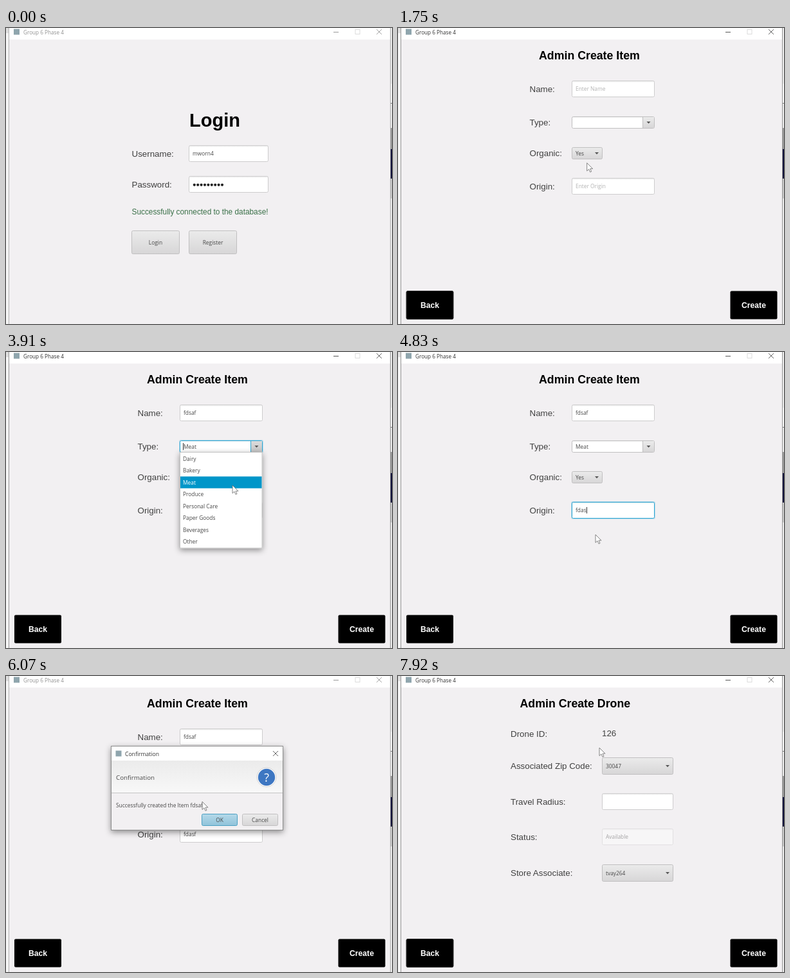
Recreate the animation shown at these times as an HTML page. Size 600x462 px, loop 8000 ms.

```html
<!DOCTYPE html>
<html lang="en">
<head>
<meta charset="utf-8">
<title>Item and drone forms</title>
<style>
  html, body { margin: 0; width: 100%; height: 100%; overflow: hidden; background: #f2f0f2; }
  svg { display: block; width: 600px; height: 462px; }
  text { white-space: pre; }
  .ui { font-family: "Open Sans", "Noto Sans", sans-serif; }
  .form { font-family: "Liberation Sans", Arial, sans-serif; }
</style>
</head>
<body>
<svg viewBox="0 0 600 462">
  <defs>
    <linearGradient id="face" x2="0" y2="1"><stop stop-color="#ebebeb"/><stop offset="1" stop-color="#d7d6d7"/></linearGradient>
    <linearGradient id="down" x2="0" y2="1"><stop stop-color="#dcdcdc"/><stop offset="1" stop-color="#c4c4c4"/></linearGradient>
    <linearGradient id="blue" x2="0" y2="1"><stop stop-color="#b5d9e9"/><stop offset="1" stop-color="#90c3da"/></linearGradient>
    <linearGradient id="head" x2="0" y2="1"><stop stop-color="#ebebeb"/><stop offset="1" stop-color="#f8f8f8"/></linearGradient>
    <linearGradient id="well" x2="0" y2="1"><stop stop-color="#e9e9e9"/><stop offset=".12" stop-color="#fff"/></linearGradient>
    <filter id="drop" x="-20%" y="-20%" width="140%" height="140%"><feDropShadow dx="0" dy="3" stdDeviation="5" flood-opacity=".42"/></filter>
  </defs>
  <g id="scene"></g>
  <g id="arrow"><path d="M0 0V12.5L3 9.8L5 14.3L7 13.4L5 9.1H9Z" fill="#fff" stroke="#666" stroke-width=".8"/></g>
  <g id="beam"><path d="M-2.5 -5.5H2.5M0 -5.5V5.5M-2.5 5.5H2.5" fill="none" stroke="#555" stroke-width=".9"/></g>
</svg>
<script>
const LOOP = 8000, STEP = 102.8;
const RING = '#2ea6d3';
const KINDS = ['Dairy', 'Bakery', 'Meat', 'Produce', 'Personal Care', 'Paper Goods', 'Beverages', 'Other'];

// Pointer path: [step, x, y]
const PATH = [
  [3, 270, 440], [9, 215, 343], [12, 215, 343], [18, 300, 200], [20, 300, 200],
  [24, 303, 105], [28, 303, 105], [32, 388, 148], [33, 388, 148], [35, 370, 180],
  [38, 352, 208], [39, 350, 210], [42, 304, 246], [44, 304, 250], [47, 307, 285],
  [51, 538, 437], [54, 538, 437], [59, 305, 196], [60, 305, 196], [62, 330, 222],
  [63, 330, 222], [66, 50, 430], [69, 50, 430], [75, 300, 85], [77, 313, 112]
];

const $ = id => document.getElementById(id);
const scene = $('scene'), arrow = $('arrow'), beam = $('beam');
const ruler = document.createElement('canvas').getContext('2d');
ruler.font = '84px "Open Sans", "Noto Sans", sans-serif';
const widthOf = s => ruler.measureText(s).width / 10;

const rect = (x, y, w, h, fill, more = '') =>
  `<rect x="${x}" y="${y}" width="${w}" height="${h}" fill="${fill}" ${more}/>`;
const disc = (x, y, r, fill, more = '') => `<circle cx="${x}" cy="${y}" r="${r}" fill="${fill}" ${more}/>`;
const line = (d, color, w = 1) => `<path d="${d}" fill="none" stroke="${color}" stroke-width="${w}"/>`;
const text = (s, x, y, size, fill, cls, more = '') =>
  `<text class="${cls}" x="${x}" y="${y}" font-size="${size}" fill="${fill}" ${more}>${s}</text>`;
const ui = (s, x, y, fill = '#484848', size = 8.4, more = '') => text(s, x, y, size, fill, 'ui', more);
const label = (s, x, y) => text(s, x, y, 13.35, '#404040', 'form');
const heading = (s, x, y, size) => text(s, x, y, size, '#000', 'form', 'font-weight="bold"');
const middle = 'text-anchor="middle"';

function box(x, y, w, h, fill, focus, edge = '#c0bfc0') {
  const glow = focus ? rect(x - .3, y - .3, w + .6, h + .6, 'none', `rx="2.5" stroke="${RING}" stroke-opacity=".3" stroke-width="1.4"`) : '';
  return glow + rect(x + .5, y + .5, w - 1, h - 1, fill, `rx="2" stroke="${focus ? RING : edge}"`);
}

function field(x, y, w, { value = '', hint = '', focus = false, h = 26 } = {}) {
  const base = y + h / 2 + 3;
  return box(x, y, w, h, 'url(#well)', focus, '#cdcccd') +
    (value ? ui(value, x + 6, base) : focus ? '' : ui(hint, x + 6, base, '#b3b3b3')) +
    (focus ? rect(x + 6.3 + widthOf(value), base - 8, .9, 10, '#222') : '');
}

const button = (s, x, y, w, h, { fill = 'url(#face)', focus, edge } = {}) =>
  box(x, y, w, h, fill, focus, edge) + ui(s, x + w / 2, y + h / 2 + 3, '#484848', 8.4, middle);

const caretDown = (x, y) => `<path d="M${x - 3} ${y - 1.5}h6l-3 3.2z" fill="#555"/>`;

const choice = (s, x, y, w, h) =>
  box(x, y, w, h, 'url(#face)') + ui(s, x + 6, y + h / 2 + 3) + caretDown(x + w - 9, y + h / 2);

const dark = (s, x, focus) =>
  rect(x + .5, 410.5, 73, 44, '#000', `rx="2" ${focus ? 'stroke="#2a2a2a"' : ''}`) +
  text(s, x + 37, 437, 12.15, '#fff', 'form', `font-weight="bold" ${middle}`);

const icon = (x, y) => rect(x, y, 9, 9, '#8fa5ad');
const cross = (x, y, color) => line(`M${x - 4} ${y - 4}l8 8m0 -8l-8 8`, color, .9);

function chrome(active) {
  const ink = active ? '#333' : '#929292', glyph = active ? '#555' : '#999';
  const edge = active ? '#959595' : '#b2b2b2';
  return rect(0, 0, 600, 462, '#f2f0f2') +
    rect(0, 0, 5, 462, '#f4f4f4') + rect(0, 0, 4, 8, '#dedede') +
    rect(5, 0, 592, 18, '#fff') +
    rect(597, 0, 3, 462, '#ececec') + rect(598, 87, 2, 30, '#f8f8f8') +
    rect(598, 117, 2, 1, '#777') + rect(598, 156, 2, 33, '#999') +
    rect(598, 189, 2, 46, '#10103a') + rect(598, 235, 2, 31, '#c9c9c9') +
    line('M4.5 0V462M597.5 0V462', edge) +
    icon(12, 1.5) + ui('Group 6 Phase 4', 27, 9.5, ink, 8.2) +
    line('M509 6.5h8', glyph) + rect(543, 2.5, 7, 7, 'none', 'stroke="#dcdcdc"') + cross(580, 6, glyph);
}

function login(n) {
  const pressed = n >= 9;
  let dots = '';
  for (let i = 0; i < 9; i++) dots += disc(292.8 + i * 5.4, 244.8, 2.1, '#222');
  return heading('Login', 285, 154, 29) +
    label('Username:', 195.5, 200.5) + field(284, 183, 124, { value: 'mworn4' }) +
    label('Password:', 195.5, 248.5) + field(284, 231, 124) + dots +
    text('Successfully connected to the database!', 195.5, 291, 11.85, '#3a7048', 'form') +
    button('Login', 195, 316, 75, 37, pressed ? { fill: 'url(#down)', focus: true } : {}) +
    button('Register', 284, 316, 75, 37);
}

function menu(row) {
  return rect(270.5, 156.5, 127.5, 149.5, '#fff', 'stroke="#c4c4c4" filter="url(#drop)"') +
    KINDS.map((s, i) => {
      const y = 157 + i * 18.5, on = i === row;
      return (on ? rect(271, y + .3, 126.5, 18.4, '#0096c9') : '') + ui(s, 275, y + 12.7, on ? '#fff' : '#484848');
    }).join('');
}

function dialog() {
  return rect(163.5, 109.5, 267, 131, '#f2f0f2', 'stroke="#8c8c8c" filter="url(#drop)"') +
    rect(164, 110, 266, 22, '#fff') + icon(170.5, 116.5) + ui('Confirmation', 185, 124.5, '#333', 8.6) +
    cross(419, 121, '#555') +
    rect(164, 132, 266, 50, 'url(#head)') + line('M164 182.5H430', '#c4c4c4') +
    ui('Confirmation', 171, 161.5, '#484848', 9.75) +
    disc(405, 158, 15, '#fff', 'stroke="#c8c8c8" stroke-width=".8"') + disc(405, 158, 13.2, '#3e77c2') +
    ui('?', 405, 164.5, '#fff', 18, middle) +
    ui('Successfully created the Item fdsaf', 171, 204.5) +
    button('OK', 304, 215, 56, 19, { fill: 'url(#blue)', edge: '#4a9fc2' }) + button('Cancel', 367, 215, 56, 19);
}

function itemForm(n, p) {
  const name = 'fdsaf'.slice(0, Math.max(0, n - 25)), origin = 'fdasf'.slice(0, Math.max(0, n - 43));
  const picking = n >= 32 && n < 42, kind = n >= 38 ? 'Meat' : '';
  return heading('Admin Create Item', 219, 49, 17.75) +
    label('Name:', 204.5, 100) + field(270, 82, 129, { value: name, hint: 'Enter Name', focus: n >= 25 && n < 32 }) +
    label('Type:', 204.5, 152) + box(270, 138, 129, 19, 'url(#well)', picking) +
    rect(381, 139, 17, 17, picking ? 'url(#down)' : 'url(#face)') +
    line('M380.5 138.5V156', picking ? RING : '#c0bfc0') + caretDown(389.5, 147.5) +
    ui(kind, 276, 150.5) + (picking ? rect(275, 142, .9, 11, '#222') : '') +
    label('Organic:', 204.5, 200) + choice('Yes', 270, 186, 48, 19) +
    label('Origin:', 204.5, 252) + field(270, 234, 129, { value: origin, hint: 'Enter Origin', focus: n >= 42 && n < 52 }) +
    dark('Back', 12.5, n < 25) + dark('Create', 516, false) +
    (n >= 33 && n < 39 ? menu(Math.floor((p.y - 157) / 18.5)) : '') +
    (n >= 55 && n < 63 ? dialog() : '');
}

function droneForm() {
  return heading('Admin Create Drone', 189.5, 49, 17.75) +
    label('Drone ID:', 175, 94.5) + label('126', 317, 94) +
    label('Associated Zip Code:', 175, 145) + choice('30047', 317, 127, 111, 27) +
    label('Travel Radius:', 175, 200.5) + field(317, 183, 111) +
    label('Status:', 175, 256) + `<g opacity=".45">${field(317, 238, 111, { value: 'Available' })}</g>` +
    label('Store Associate:', 175, 312) + choice('tvay264', 317, 294, 111, 27) +
    dark('Back', 12.5, true) + dark('Create', 516, false);
}

function pointer(n) {
  const i = PATH.findIndex(k => k[0] > n);
  if (i < 0) { const [, x, y] = PATH[PATH.length - 1]; return { x, y }; }
  if (!i) return null;
  const [a, ax, ay] = PATH[i - 1], [b, bx, by] = PATH[i];
  const u = (n - a) / (b - a), e = u * u * (3 - 2 * u);
  return { x: ax + (bx - ax) * e, y: ay + (by - ay) * e };
}

// The text beam shows over editable fields of the item form.
function overField(n, p) {
  const within = (y, h, right) => p.x > 270 && p.x < right && p.y > y && p.y < y + h;
  const free = n >= 15 && n < 70 && !(n >= 33 && n < 39) && !(n >= 55 && n < 63);
  return free && (within(82, 26, 398) || within(138, 19, 380) || within(234, 26, 398));
}

function place(el, p, show) {
  el.style.display = show ? '' : 'none';
  if (show) el.setAttribute('transform', `translate(${p.x.toFixed(1)} ${p.y.toFixed(1)})`);
}

let last = -1;
function draw(ms) {
  const n = Math.min(77, Math.floor((ms % LOOP + 5) / STEP));
  if (n === last) return;
  last = n;
  const p = pointer(n), editing = p && overField(n, p);
  const active = n >= 8 && !(n >= 55 && n < 63);
  scene.innerHTML = chrome(active) + (n < 15 ? login(n) : n < 72 ? itemForm(n, p) : droneForm());
  place(arrow, p, p && !editing);
  place(beam, p, editing);
}

const start = performance.now();
function tick() {
  draw(performance.now() - start);
  requestAnimationFrame(tick);
}
tick();
</script>
</body>
</html>
```
